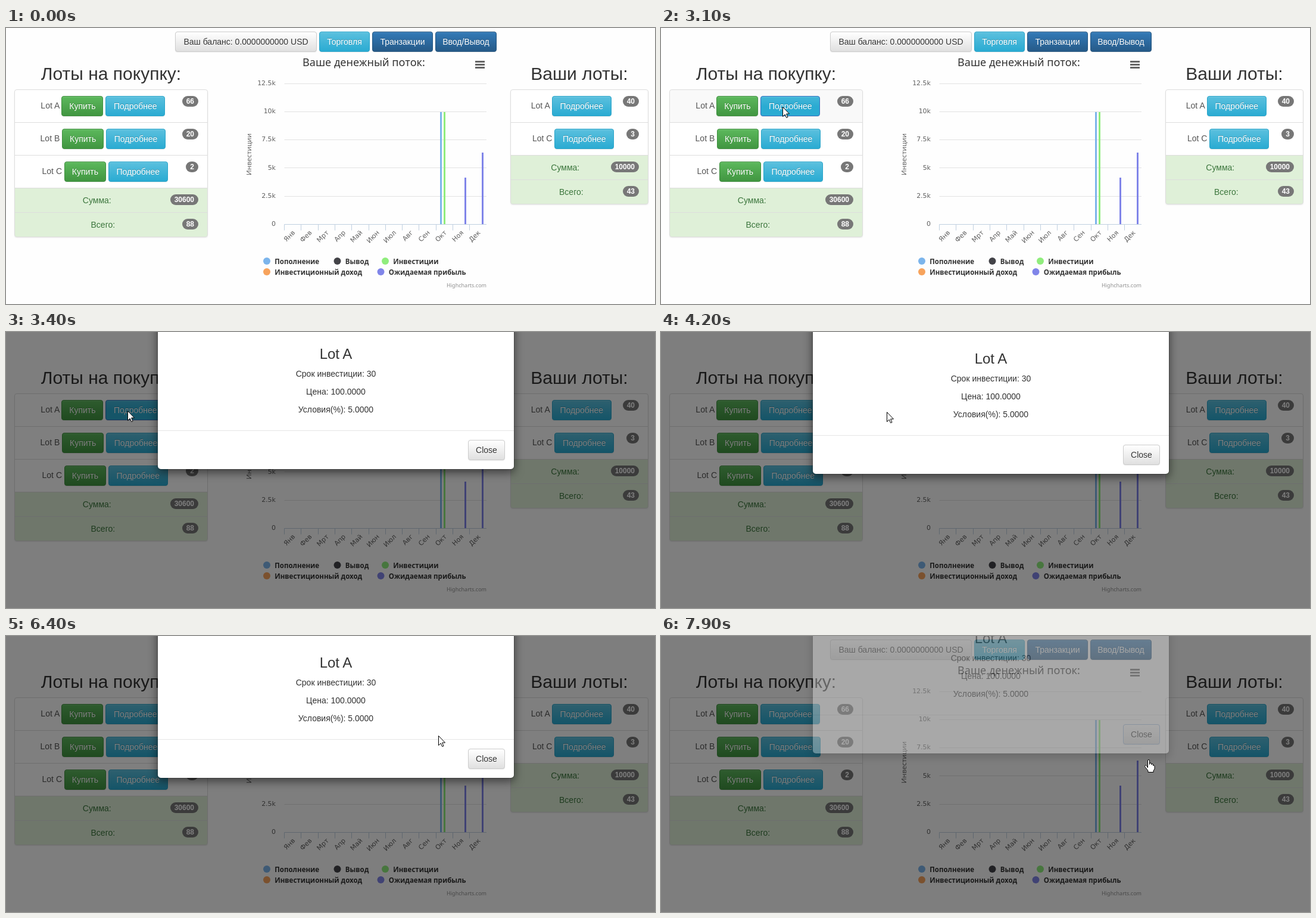
Write an HTML page that moves like this. It is 1090x463 px and loops after 8 s.

```html
<!DOCTYPE html>
<html lang="ru">
<head>
<meta charset="utf-8">
<title>Лоты</title>
<style>
* { box-sizing: border-box; }
html, body { margin: 0; width: 100%; height: 100%; overflow: hidden; background: #fff; }
body { font: 14px/20px "Liberation Sans", Arial, sans-serif; color: #333; }
#stage { position: absolute; left: 0; top: 0; width: 1090px; height: 463px; overflow: hidden; background: #fefefe; }
#stage > * { position: absolute; }

.bar { left: 284px; top: 6px; display: flex; gap: 4px; }
.btn {
  display: inline-block; height: 34px; padding: 6px 0; text-align: center; vertical-align: middle;
  border: 1px solid var(--edge); border-radius: 4px; color: #fff; white-space: nowrap;
  background: var(--low) linear-gradient(var(--high), var(--low)) repeat-x;
  text-shadow: 0 -1px 0 rgba(0,0,0,.2);
  box-shadow: inset 0 1px 0 rgba(255,255,255,.15), 0 1px 1px rgba(0,0,0,.075);
}
.plain { --high: #fff; --low: #e0e0e0; --edge: #ccc; color: #333; text-shadow: 0 1px 0 #fff; }
.info { --high: #5bc0de; --low: #2aabd2; --edge: #28a4c9; }
.primary { --high: #337ab7; --low: #265a88; --edge: #245580; }
.success { --high: #5cb85c; --low: #419641; --edge: #3e8f3e; }

.lots { top: 60px; text-align: center; }
.lots .success { width: 70px; }
.lots .info { width: 100px; }
h2 { margin: 0 0 10px; font-size: 30px; line-height: 33px; white-space: nowrap; }
h2, h3 { font-weight: normal; }
ul { margin: 0; padding: 0; list-style: none; border-radius: 4px; box-shadow: 0 1px 2px rgba(0,0,0,.075); }
li { padding: 10px 15px; margin-bottom: -1px; border: 1px solid #ddd; background: #fff; color: #555; }
li:first-child { border-radius: 4px 4px 0 0; }
li:last-child { border-radius: 0 0 4px 4px; margin: 0; }
li.sum { background: #dff0d8; color: #3c763d; }
.badge {
  float: right; min-width: 10px; padding: 3px 7px; border-radius: 10px;
  background: #777; color: #fff; font: bold 12px/12px "Liberation Sans", Arial, sans-serif;
}

#chart { left: 0; top: 0; font-family: "Noto Sans", "Open Sans", sans-serif; fill: #333; }
#chart .axis { font: 11px "DejaVu Sans", sans-serif; fill: #606060; }
#chart .legend { font-size: 11.5px; font-weight: bold; }

#shade { inset: 0; background: #000; opacity: 0; }
#modal {
  left: 254px; top: -100px; width: 600px; height: 339px; text-align: center;
  background: #fff; background-clip: padding-box; border: 1px solid rgba(0,0,0,.2);
  border-radius: 6px; box-shadow: 0 5px 15px rgba(0,0,0,.5); opacity: 0;
}
#modal h3 { margin: 130.6px 0 10px; font-size: 24px; line-height: 26.4px; }
#modal p { margin: 0 0 10px; }
#modal footer { margin-top: 25px; padding: 15px; border-top: 1px solid #e5e5e5; text-align: right; }
#close { width: 62px; }

#cursor { left: 0; top: 0; width: 20px; height: 24px; overflow: visible; fill: #fff; stroke: #000; }
.shape { visibility: hidden; }

/* One percent is 80 ms, so 1.25% is one 100 ms tick. */
#cursor { animation: travel 8s step-end infinite; }
#arrow { animation: arrow 8s step-end infinite; }
#hand { animation: hand 8s step-end infinite; }
#beam { animation: beam 8s step-end infinite; }
#shade { animation: shade 8s step-end infinite; }
#modal { animation: modal 8s step-end infinite; }
#close { animation: close 8s step-end infinite; }
#detail { animation: detail 8s step-end infinite; }
#row { animation: row 8s step-end infinite; }

@keyframes travel {
  0% { transform: translate(-60px, 0); }
  6.25% { transform: translate(1028px, 29px); }
  7.5% { transform: translate(902px, 40px); }
  8.75% { transform: translate(883px, 42px); }
  15% { transform: translate(867px, 44px); }
  16.25% { transform: translate(429px, 43px); }
  17.5% { transform: translate(190px, 84px); }
  18.75% { transform: translate(80px, 108px); }
  20% { transform: translate(66px, 120px); }
  21.25% { transform: translate(98px, 128px); }
  22.5% { transform: translate(140px, 131px); }
  23.75% { transform: translate(182px, 132px); }
  25% { transform: translate(199px, 132px); }
  36.25% { transform: translate(204px, 132px); }
  50% { transform: translate(370px, 121px); }
  51.25% { transform: translate(373px, 126px); }
  52.5% { transform: translate(379px, 134px); }
  53.75% { transform: translate(499px, 196px); }
  55% { transform: translate(624px, 194px); }
  56.25% { transform: translate(703px, 176px); }
  57.5% { transform: translate(711px, 131px); }
  58.75% { transform: translate(700px, 96px); }
  60% { transform: translate(685px, 67px); }
  61.25% { transform: translate(657px, 46px); }
  62.5% { transform: translate(600px, 24px); }
  63.75% { transform: translate(552px, 18px); }
  65% { transform: translate(511px, 21px); }
  66.25% { transform: translate(464px, 105px); }
  67.5% { transform: translate(510px, 160px); }
  68.75% { transform: translate(573px, 186px); }
  70% { transform: translate(552px, 180px); }
  71.25% { transform: translate(490px, 100px); }
  72.5% { transform: translate(506px, 150px); }
  73.75% { transform: translate(617px, 194px); }
  75% { transform: translate(624px, 194px); }
  76.25% { transform: translate(719px, 203px); }
  77.5% { transform: translate(740px, 205px); }
  78.75% { transform: translate(735px, 190px); }
  80% { transform: translate(726px, 167px); }
  86.25% { transform: translate(738px, 178px); }
  87.5% { transform: translate(760px, 188px); }
  88.75% { transform: translate(780px, 195px); }
  91.25% { transform: translate(803px, 204px); }
  92.5% { transform: translate(813px, 207px); }
  95%, 100% { transform: translate(812px, 207px); }
}
@keyframes arrow {
  0% { visibility: visible; }
  21.25% { visibility: hidden; }
  36.25% { visibility: visible; }
  66.25% { visibility: hidden; }
  67.5% { visibility: visible; }
  71.25% { visibility: hidden; }
  73.75% { visibility: visible; }
  88.75%, 100% { visibility: hidden; }
}
@keyframes hand {
  0% { visibility: hidden; }
  21.25% { visibility: visible; }
  36.25% { visibility: hidden; }
  88.75%, 100% { visibility: visible; }
}
@keyframes beam {
  0% { visibility: hidden; }
  66.25% { visibility: visible; }
  67.5% { visibility: hidden; }
  71.25% { visibility: visible; }
  73.75%, 100% { visibility: hidden; }
}
@keyframes shade { 40%, 100% { opacity: .5; } }
@keyframes modal {
  0% { opacity: 0; }
  41.25% { opacity: .8; transform: translateY(-34px); }
  42.5% { opacity: 1; transform: translateY(-8px); }
  43.75% { opacity: 1; transform: none; }
  97.5% { opacity: .9; transform: translateY(-6px); }
  98.75%, 100% { opacity: .33; transform: translateY(-41px); }
}
@keyframes close {
  88.75% { background-position: 0 -15px; border-color: #adadad; }
  97.5%, 100% { background-position: 0 0; border-color: #9dbbe0; }
}
@keyframes detail {
  0% { background-position: 0 0; border-color: var(--edge); }
  23.75% { background-position: 0 -15px; border-color: var(--edge); }
  36.25% { background-position: 0 -15px; border-color: #2f6fc0; }
  50%, 100% { background-position: 0 0; border-color: var(--edge); }
}
@keyframes row {
  0% { background: #fff; }
  18.75% { background: #f9f9f9; }
  40%, 100% { background: #fff; }
}
</style>
</head>
<body>
<div id="stage">
  <div class="bar">
    <span class="btn plain" style="width:238px">Ваш баланс: 0.0000000000 USD</span>
    <span class="btn info" style="width:85px">Торговля</span>
    <span class="btn primary" style="width:102px">Транзакции</span>
    <span class="btn primary" style="width:103px">Ввод/Вывод</span>
  </div>

  <section class="lots" style="left:14px;width:325px">
    <h2>Лоты на покупку:</h2>
    <ul>
      <li id="row"><span class="badge">66</span>Lot A <span class="btn success">Купить</span> <span class="btn info" id="detail">Подробнее</span></li>
      <li><span class="badge">20</span>Lot B <span class="btn success">Купить</span> <span class="btn info">Подробнее</span></li>
      <li><span class="badge">2</span>Lot C <span class="btn success">Купить</span> <span class="btn info">Подробнее</span></li>
      <li class="sum"><span class="badge">30600</span>Сумма:</li>
      <li class="sum"><span class="badge">88</span>Всего:</li>
    </ul>
  </section>

  <section class="lots" style="left:847px;width:232px">
    <h2>Ваши лоты:</h2>
    <ul>
      <li><span class="badge">40</span>Lot A <span class="btn info">Подробнее</span></li>
      <li><span class="badge">3</span>Lot C <span class="btn info">Подробнее</span></li>
      <li class="sum"><span class="badge">10000</span>Сумма:</li>
      <li class="sum"><span class="badge">43</span>Всего:</li>
    </ul>
  </section>

  <svg id="chart" width="1090" height="463">
    <text x="601" y="64" font-size="18" text-anchor="middle">Ваше денежный поток:</text>
    <path d="M788 56.5h16M788 61.5h16M788 66.5h16" stroke="#666" stroke-width="3"/>
    <text transform="translate(412 212) rotate(-90)" font-size="11.6" text-anchor="middle" fill="#666">Инвестиции</text>
    <text x="807" y="435" font-size="9" text-anchor="end" fill="#909090">Highcharts.com</text>
  </svg>

  <div id="shade"></div>

  <div id="modal">
    <h3>Lot A</h3>
    <p>Срок инвестиции: 30</p>
    <p>Цена: 100.0000</p>
    <p>Условия(%): 5.0000</p>
    <footer><span class="btn plain" id="close">Close</span></footer>
  </div>

  <svg id="cursor">
    <path class="shape" id="arrow" d="M.5.5V16.5L4.2 13 6.7 18.5 9 17.5 6.6 12H11.5Z"/>
    <path class="shape" id="hand" d="M5.5 14V2a1.5 1.5 0 0 1 3 0v6.5v-1a1.5 1.5 0 0 1 3 0V9a1.5 1.5 0 0 1 3 0v1.5a1.4 1.4 0 0 1 2.5.5v5l-2 3v2.5H6V19l-5-6.5a1.6 1.6 0 0 1 2.5-2z"/>
    <path class="shape" id="beam" d="M1 .5H7M4 .5V16.5M1 16.5H7" fill="none"/>
  </svg>
</div>

<script>
const chart = document.getElementById('chart');

function add(tag, attrs, text = '') {
  const node = document.createElementNS(chart.namespaceURI, tag);
  for (const key in attrs) node.setAttribute(key, attrs[key]);
  node.textContent = text;
  chart.append(node);
}

const left = 467.5, right = 807, base = 329.5, step = 28.3;

['0', '2.5k', '5k', '7.5k', '10k', '12.5k'].forEach((label, i) => {
  const y = Math.floor(base - i * 47.3) + .5;
  add('path', { d: `M${left} ${y}H${right}`, stroke: i ? '#e2e2e2' : '#c0d0e0' });
  add('text', { x: 453, y: Math.round(332 - i * 47.2), class: 'axis', 'text-anchor': 'end' }, label);
});

const months = 'Янв Фев Мрт Апр Май Июн Июл Авг Сен Окт Ноя Дек'.split(' ');
months.forEach((label, i) => {
  const x = left + i * step;
  add('path', { d: `M${Math.floor(x) + .5} ${base}v10`, stroke: '#c0d0e0' });
  add('text', {
    class: 'axis', 'text-anchor': 'end',
    transform: `translate(${x + step / 2 + 4.5} 344) rotate(-45)`
  }, label);
});

const blue = '#7cb5ec', green = '#90ed7d', violet = '#8085e9';

[[729, 141, blue], [735, 141, green], [770, 251, violet], [799, 209, violet]].forEach(([x, y, fill]) =>
  add('rect', { x, y, width: 3, height: 329 - y, fill }));

[
  [438, 391, blue, 'Пополнение'],
  [556.5, 391, '#434348', 'Вывод'],
  [637, 391, green, 'Инвестиции'],
  [438, 409, '#f7a35c', 'Инвестиционный доход'],
  [629.5, 409, violet, 'Ожидаемая прибыль']
].forEach(([cx, cy, fill, label]) => {
  add('circle', { cx, cy, r: 6, fill });
  add('text', { x: cx + 13.3, y: cy + 5, class: 'legend' }, label);
});
</script>
</body>
</html>
```
